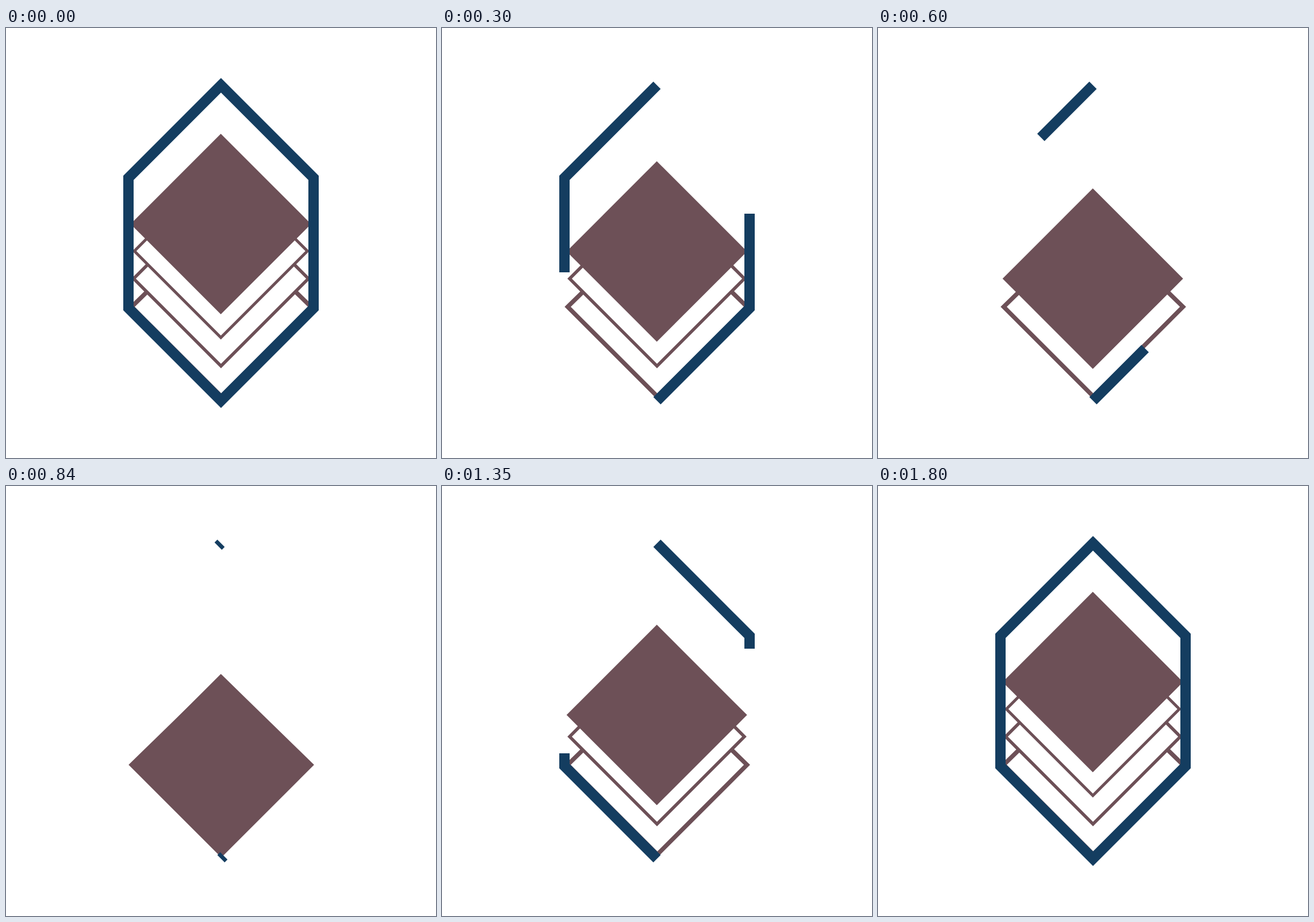
These frames come from a looping animation (748x748 px, 1830 ms). An HTML page:

```html
<!DOCTYPE html>
<html lang="en">
<head>
<meta charset="utf-8">
<title>Stacked diamonds in a hexagon</title>
<style>
  html, body { margin: 0; width: 100%; height: 100%; overflow: hidden; background: #fff; }
  svg { display: block; width: 100%; height: 100%; }
  #stack polygon { fill: #fff; stroke: #6d5057; }
  #stack #tile { fill: #6d5057; stroke: none; }
  #frame { fill: none; stroke: #143d60; stroke-width: 18; stroke-miterlimit: 10; }
</style>
</head>
<body>
<svg viewBox="0 0 748 748">
  <g id="stack"></g>
  <g id="frame">
    <path class="arm" d="M374 99.7L213 260.7V487.3L374 648.3"/>
    <path class="arm" d="M374 648.3L535 487.3V260.7L374 99.7"/>
    <path id="ring" d="M374 99.7L213 260.7V487.3L374 648.3L535 487.3V260.7Z"/>
  </g>
</svg>
<script>
const LOOP = 1830, HALF = 900, STEP = 300, TICK = 30;
const SIDE = 682;
const STATIONS = [341, 388.7, 436, 485];

const stack = document.getElementById('stack');
const frame = document.getElementById('frame');
const ring = document.getElementById('ring');
const arms = document.querySelectorAll('.arm');

function bezier(x1, y1, x2, y2) {
  const at = (a, b, p) => 3 * a * p * (1 - p) ** 2 + 3 * b * p * p * (1 - p) + p ** 3;
  return x => {
    let lo = 0, hi = 1;
    for (let i = 0; i < 30; i++) {
      const mid = (lo + hi) / 2;
      if (at(x1, x2, mid) < x) lo = mid; else hi = mid;
    }
    return at(y1, y2, hi);
  };
}
const armEase = bezier(1 / 3, 0, 5 / 6, 5 / 6);
const hopEase = bezier(0.5, 0, 0.12, 1);

function diamond(cx, radius, top, strokeWidth) {
  const el = document.createElementNS('http://www.w3.org/2000/svg', 'polygon');
  el.setAttribute('points', `${cx - radius},0 ${cx},${-top} ${cx + radius},0 ${cx},${radius}`);
  el.setAttribute('stroke-width', strokeWidth);
  return stack.appendChild(el);
}
const outlines = [
  { el: diamond(374.6, 156, 152, 7.5), rest: 485 },
  { el: diamond(374, 152, 152, 5.5), rest: 436 },
  { el: diamond(373.8, 150.5, 150.5, 5), rest: 388 }
];
const tile = diamond(373.7, 157, 157, 0);
tile.id = 'tile';

const moveTo = (el, y) => el.setAttribute('transform', `translate(0 ${y})`);

// The tile hops down three stations, then back up.
function tileY(t) {
  const hop = Math.min(5, Math.floor(t / STEP));
  const station = i => STATIONS[3 - Math.abs(3 - i)];
  const from = station(hop), to = station(hop + 1);
  return from + (to - from) * hopEase(t / STEP - hop);
}

function render(t) {
  const y = tileY(t);
  moveTo(tile, y);
  // An outline the tile has reached stays hidden underneath it.
  outlines.forEach(o => moveTo(o.el, Math.max(o.rest, y)));

  const distance = Math.abs(t - HALF) / HALF;
  const full = distance >= 1;
  const length = Math.min(SIDE, SIDE * 1.01 * armEase(distance));
  ring.style.display = full ? '' : 'none';
  arms.forEach(arm => {
    arm.style.display = full || !distance ? 'none' : '';
    arm.setAttribute('stroke-dasharray', `${length} 2000`);
  });
  frame.setAttribute('transform', t > HALF ? 'translate(748 0) scale(-1 1)' : '');
}

const start = performance.now();
function loop(now) {
  const t = Math.max(0, now - start) % LOOP;
  render(Math.floor(t / TICK) * TICK);
  requestAnimationFrame(loop);
}
render(0);
requestAnimationFrame(loop);
</script>
</body>
</html>
```
